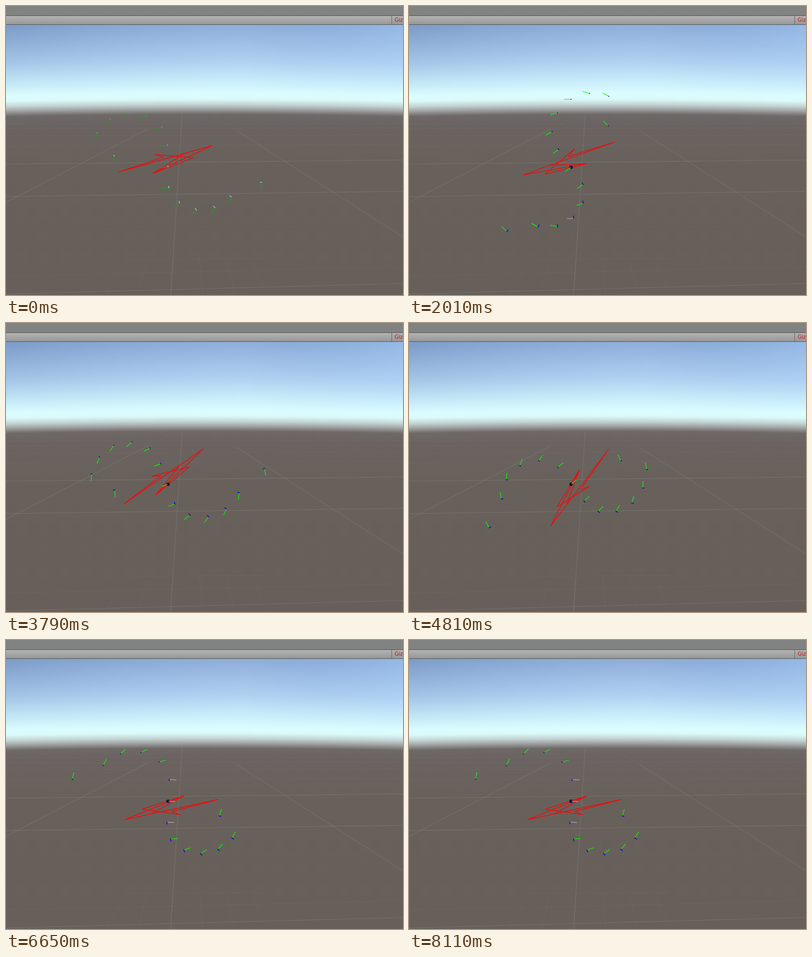
An HTML page with a canvas that plays this animation: 757x552 px, repeating every 8.18 s.

```html
<!DOCTYPE html>
<html lang="en">
<head>
<meta charset="utf-8">
<title>Spinning chain</title>
<style>
html, body { margin: 0; width: 100%; height: 100%; overflow: hidden; background: #68615b; }
canvas { display: block; }
</style>
</head>
<body>
<canvas id="stage" width="757" height="552"></canvas>
<script>
const W = 757, H = 552, LOOP = 8180, STEP = 77.4, CX = 309, CY = 308;
const ctx = document.getElementById('stage').getContext('2d');

// Points are [radius, lag in degrees]; a negative radius lies on the opposite arm.
// Joints alternate between the arms, and the last two swing loose.
const joints = Array.from({ length: 14 }, (_, i) => {
  const pair = Math.ceil(i / 2), even = i % 2 === 0;
  const r = i < 12 ? 44 * pair - 3.3 * pair * pair : 184 - 81 * (i - 12);
  return [even ? r : -r, Math.max(0, (even ? 8 : 7) * (i - 2))];
});

// Red outline: a tight zigzag, then five long corners
const zigzag = Array.from({ length: 5 }, (_, k) => k % 2 ? [40, 130] : [-32, 112]);
const star = [...zigzag, [52, 110], [-35, 45], [-21, 21], [-95, 95], [92, 116]];

// Spin in degrees at chosen steps; it turns back near steps 3 and 34.
const spinKeys = [
  [0, 178], [3.4, 495], [9, -34], [26, -1655], [33.9, -2394],
  [37, -2065], [62, 322], [86, 2523], [105, 4323]
];

function spinAt(n) {
  const i = spinKeys.findIndex(k => k[0] >= n) || 1;
  const [n0, a] = spinKeys[i - 1], [n1, b] = spinKeys[i];
  return a + (b - a) * (n - n0) / (n1 - n0);
}

// The chain trails the spin, so its bend flips at each reversal.
const twistAt = n => Math.tanh((15.7 - Math.abs(n - 19.1)) / 1.4);

const rad = deg => deg * Math.PI / 180;
const clamp = (v, lo, hi) => Math.min(hi, Math.max(lo, v));

function place([r, lag], spin, twist) {
  const a = rad(spin + twist * lag);
  const reach = r * (1 + .15 * Math.max(0, 1 - twist * twist / .83));
  const x = reach * Math.sin(a), y = -reach * Math.cos(a);
  const depth = 1 - y * .00044;
  return { x: CX + x * depth, y: CY + y * depth, a };
}

function line(c, x0, y0, x1, y1, color, width = 1.2) {
  c.strokeStyle = color;
  c.lineWidth = width;
  c.beginPath();
  c.moveTo(x0, y0);
  c.lineTo(x1, y1);
  c.stroke();
}

function fade(c, x1, y1, stops) {
  const g = c.createLinearGradient(0, 0, x1, y1);
  stops.forEach(([p, color]) => g.addColorStop(p, color));
  return g;
}

function drawSky(c) {
  const at = (y, color) => [y / H, color];
  c.fillStyle = fade(c, 0, H, [
    at(36, '#8fadd9'), at(105, '#b0d1f1'), at(140, '#c8ebfa'), at(168, '#dcfdff'),
    at(178, '#daf9f9'), at(188, '#c4d4d4'), at(196, '#a4a9a8'), at(207, '#6e6867'),
    at(225, '#6a6361'), at(300, '#68615b'), at(H, '#675f59')
  ]);
  // Each column sinks a little towards the sides to curve the horizon.
  for (let x = 0; x < W; x++) {
    c.setTransform(1, 0, 0, 1, 0, 4 * (x / 378 - 1) ** 2);
    c.fillRect(x, -10, 1, H + 20);
  }
  c.setTransform(1, 0, 0, 1, 0, 0);

  const tint = fade(c, W, 0, [[0, '#40608c38'], [.6, '#6090c800'], [1, '#a4d0ff58']]);
  c.fillStyle = tint;
  for (let y = 36; y < 176; y++) {
    c.globalAlpha = 1 - (y - 36) / 140;
    c.fillRect(0, y, W, 1);
  }
  c.globalAlpha = 1;
}

function drawGrid(c) {
  const soft = 'rgba(150,155,155,.3)', faint = 'rgba(150,155,155,.1)';
  // Rows close up towards the horizon.
  line(c, 0, 550, W, 530, soft, 1);
  line(c, 0, 364, W, 354, soft, 1);
  line(c, 0, 302, W, 294, soft, 1);
  for (let k = 0; k < 4; k++) {
    const y = 206 + 62 * .68 ** k;
    line(c, 0, y, W, y - 4 * .6 ** k, faint, 1);
  }
  line(c, 336, 206, 314, H, soft, 1);
  line(c, 0, 375, 270, 235, soft, 1);
  line(c, W, 441, 440, 238, soft, 1);
  line(c, 270, 235, 325, 207, faint, 1);
  line(c, 440, 238, 392, 207, faint, 1);
  // Fine cells close to the camera
  line(c, 0, 516, W, 498, faint, 1);
  line(c, 230, 484, 500, 482, faint, 1);
  for (let k = -3; k <= 2; k++) {
    line(c, 369 + 51 * k, 482 + 3 * k * k, 375 + 62 * k, H, faint, 1);
  }
}

function drawToolbar(c) {
  c.fillStyle = '#808381';
  c.fillRect(0, 0, W, 18);
  c.fillStyle = '#555755';
  c.fillRect(0, 18, W, 18);
  c.fillStyle = fade(c, 0, 35, [[.54, '#b3b3b3'], [1, '#989898']]);
  c.fillRect(0, 19, W, 16);
  c.fillStyle = '#666';
  c.fillRect(735, 19, 1, 16);
  c.fillStyle = '#c01414';
  c.font = '10px "DejaVu Sans", sans-serif';
  c.fillText('Giz', 741, 30);
}

function drawJoint({ x, y, a }, dim) {
  const dx = Math.cos(a), dy = Math.sin(a);
  const green = dim ? '#1a1' : Math.abs(dy) < .06 ? '#aaa69f' : '#0f0';
  line(ctx, x, y, x + 13.5 * dx, y + 13.5 * dy, green);
  // Seen from above, the blue axis shortens with distance.
  const blue = clamp((y - 180) / 40, 0, 5);
  line(ctx, x, y, x - blue * dy, y + blue * dx, dim ? '#9fbcff' : '#00f', 1.4);
  if (!dim) {
    ctx.fillStyle = '#0a0a50';
    ctx.fillRect(x - .8, y - .8, 1.6, 1.6);
  }
}

const backdrop = document.createElement('canvas');
backdrop.width = W;
backdrop.height = H;
[drawSky, drawGrid, drawToolbar].forEach(paint => paint(backdrop.getContext('2d')));

function draw(t) {
  const n = clamp(Math.floor((t - 60) / STEP) + 1, 0, 105);
  const spin = spinAt(n), twist = twistAt(n), dim = n === 0;
  ctx.drawImage(backdrop, 0, 0);

  ctx.strokeStyle = '#f00';
  ctx.lineWidth = 1.2;
  ctx.lineJoin = 'bevel';
  ctx.beginPath();
  star.forEach(v => {
    const p = place(v, spin, twist);
    ctx.lineTo(p.x, p.y);
  });
  ctx.closePath();
  ctx.stroke();

  if (!dim) {
    ctx.fillStyle = '#15151f';
    ctx.beginPath();
    ctx.arc(CX, CY, 3.2, 0, 7);
    ctx.fill();
  }
  joints.forEach(j => drawJoint(place(j, spin, twist), dim));
}

const begin = performance.now();
function tick() {
  draw((performance.now() - begin) % LOOP);
  requestAnimationFrame(tick);
}
tick();
</script>
</body>
</html>
```
